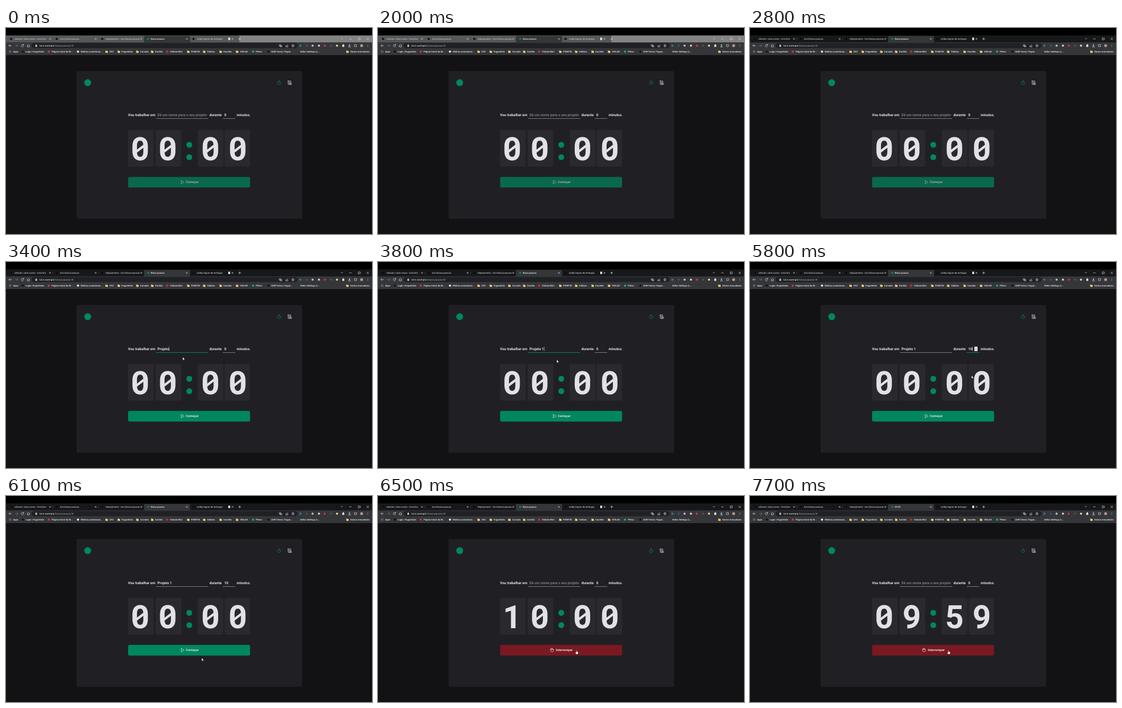
Write an HTML page that moves like this. It is 690 px wide and 388 px high and loops after 8000 ms.

```html
<!DOCTYPE html>
<html lang="pt-BR">
<head>
<meta charset="utf-8">
<title>Timer</title>
<style>
html, body { margin: 0; width: 100%; height: 100%; overflow: hidden; background: #000; }
svg { display: block; width: 100%; height: 100%; }
text { font-family: Roboto, sans-serif; text-rendering: geometricPrecision; white-space: pre; }
.ui { font-size: 4.25px; font-weight: 500; }
.form { font-size: 6.68px; font-weight: 700; fill: #e1e1e6; }
.label { font-size: 5.95px; font-weight: 700; fill: #e1e1e6; }
.digit { font-size: 60.7px; font-weight: 600; fill: #e1e1e6; text-anchor: middle; }
.line { fill: none; stroke-width: .75; stroke-linecap: round; stroke-linejoin: round; }
</style>
</head>
<body>
<svg id="stage" viewBox="0 0 690 388">
  <rect y="14" width="690" height="374" fill="#121214"/>
  <g id="browser"></g>
  <rect x="133" y="81" width="425.5" height="278.5" rx="3" fill="#202024"/>
  <circle cx="154" cy="103" r="6.5" fill="#00875f"/>
  <g class="line" stroke="#00875f">
    <circle cx="514.8" cy="103.6" r="3"/>
    <path d="M514.8 103.6l1.3-1.3M513.7 99.3h2.2"/>
  </g>
  <path class="line" stroke="#e1e1e6" d="M532 102v-1.2a1.1 1.1 0 0 0-1-1.2h5a1.1 1.1 0 0 1 1 1.2v3.8M532 102v3.5a1 1 0 0 0 1 1h4.5a1 1 0 0 0 .9-1.6h-4.6M533.8 102h2M533.8 103.6h2"/>

  <g class="form">
    <text x="230" y="166">Vou trabalhar em</text>
    <text id="task" x="285.5" y="166"></text>
    <text x="383.5" y="166">durante</text>
    <rect id="selection" x="411.3" y="159.5" width="4.3" height="8" fill="#2f83d8"/>
    <text id="minutes" x="411.5" y="166"></text>
    <text x="434.7" y="166">minutos.</text>
  </g>
  <rect id="taskLine" x="283" y="170" width="98" height="1"/>
  <rect id="minutesLine" x="408.800" y="170" width="23.4" height="1"/>
  <rect id="caret" y="159.5" width=".6" height="8" fill="#e1e1e6"/>
  <g id="spinner">
    <rect x="423" y="159.5" width="6" height="8.3" fill="#f0f0f0"/>
    <path d="M424.8 162.6l1.2-1.5 1.2 1.5zM424.8 164.8l1.2 1.5 1.2-1.5z" fill="#505050"/>
  </g>

  <g id="clock"></g>
  <circle cx="345.5" cy="220" r="5.5" fill="#00875f"/>
  <circle cx="345.5" cy="243.3" r="5.5" fill="#00875f"/>

  <g id="button">
    <rect id="buttonBox" x="230.2" y="280.4" width="229.9" height="20.1" rx="3"/>
    <g id="start">
      <path class="line" stroke="#e1e1e6" d="M330.7 287.2l5 3.1-5 3.1z"/>
      <text class="label" x="339" y="292.4">Começar</text>
    </g>
    <g id="stop">
      <path class="line" stroke="#e1e1e6" d="M325.3 290v-1.6a.8.8 0 0 1 1.6 0v-.7a.8.8 0 0 1 1.6 0v.7a.8.8 0 0 1 1.6 0v1.2a.5.5 0 0 1 1 0v1a2.9 2.9 0 0 1-5.8 0zM326.9 288.4v1.2M328.5 288.4v1.4"/>
      <text class="label" x="335.3" y="292.4">Interromper</text>
    </g>
  </g>

  <g id="cursor" stroke="#111" stroke-width=".4">
    <path id="arrow" fill="#fff" d="M0 0v5.8l1.3-1.2.9 2 .9-.4-.9-1.9h1.9z"/>
    <path id="hand" fill="#fff" d="M-.6 0q.6-.7 1.2 0v2.6q1.9.1 2.7 1v2q-.3 1.3-.9 1.9h-2.7l-2-3q.2-.9 1.7.1z"/>
  </g>
</svg>
<script>
const DURATION = 8000, STEP = 100;
const $ = id => document.getElementById(id);
const GREEN = '#00875f', GRAY = '#7c7c8a', WHITE = '#e1e1e6';

const rect = (x, y, w, h, fill, rx = 0) =>
  `<rect x="${x}" y="${y}" width="${w}" height="${h}" fill="${fill}" rx="${rx}"/>`;
const dot = (x, y, fill, r = 2) => `<circle cx="${x}" cy="${y}" r="${r}" fill="${fill}"/>`;
const label = (x, y, text, fill, extra = '') =>
  `<text class="ui" x="${x}" y="${y}" fill="${fill}" ${extra}>${text}</text>`;
const line = (d, color = '#d4d7da') => `<path class="line" stroke="${color}" d="${d}"/>`;
const cross = (x, y, r = 1.2) => line(`M${x - r} ${y - r}l${2 * r} ${2 * r}m0 ${-2 * r}l${-2 * r} ${2 * r}`);
const folder = x => `<path fill="#f3d06b" d="M${x - 2.2} 42.6h1.7l.6.7h2.2v3.4h-4.5z"/>`;

function tabStrip() {
  const tabs = [
    [16, 'refactor: rotas novas - torvi/bra'],
    [102, 'torvi/brasa-pausas'],
    [188, 'Deployments · torvi/brasa-pausas'],
    [273, 'Brasa pausas'],
    [360, 'nelbo/regras-de-entregas']
  ];
  let out = rect(0, 14, 690, 13, '#17181a')
    + `<g id="inactiveStrip">${rect(0, 14, 440, 13, '#56575a')}${rect(440, 14, 250, 13, '#828282')}</g>`
    + rect(260, 15, 87, 13, '#35363a', 2);
  tabs.forEach(([x, title], i) => {
    const active = i === 3;
    out += dot(x - (active ? 5 : 6.5), 20.5, active ? GREEN : '#0b0c0e', 2)
      + label(x, 22, title, active ? '#f1f3f4' : '#c0c3c7', active ? 'id="tabTitle"' : '')
      + cross(83 + 86 * i, 20.5);
    if (i < 2) out += rect(88 + 86 * i, 18, .5, 5, '#4a4c50');
  });
  return out + rect(419, 18.2, 3.5, 4.5, '#e8eaed')
    + line('M438.3 20.5h4.4m-2.2-2.2v4.4M631.7 19.5l1.5 1.5 1.5-1.5M647.5 20.5h3.5M664.5 18.8h3.4v3.4h-3.4z')
    + cross(682, 20.5, 1.7);
}

function toolbar() {
  const extensions = [[555, '#287d93'], [567, '#4a5055'], [578, '#b9bdc2'], [590, '#cfcfc4'],
    [601, '#db285f'], [613, '#55514a'], [624, '#e5cf90']];
  return rect(0, 27, 690, 24, '#35363a') + rect(48, 28.3, 502, 9.7, '#202124', 4.8)
    + line('M10.5 33.2h-5m2-2l-2 2 2 2')
    + line('M17.5 33.2h5m-2-2l2 2-2 2', '#77797d')
    + line('M33.2 32a2.3 2.3 0 1 0 .1 2.3m.1-3.6v1.6h-1.6M39.7 33.4l2.5-2.4 2.5 2.4m-4.3-.4v2.6h3.6v-2.6')
    + rect(55.5, 32.7, 3, 2.7, '#d4d7da') + line('M56.1 32.7v-.8a.9.9 0 0 1 1.8 0v.8')
    + `<text x="63" y="34.9" font-size="4.7" fill="#a9aeb4"><tspan fill="#f1f3f4">torvi.exemplo</tspan>/brasa-pausas/#/</text>`
    + line('M515.5 31.5h2.5v2.5h-2.5zM517.5 33h2.5v2.5h-2.5zM527.5 33v2.5h4v-1.5m-2.5 0q0-2 2.5-2.2')
    + line('M541 30.9l.7 1.5 1.7.2-1.2 1.2.3 1.7-1.5-.8-1.5.8.3-1.7-1.2-1.2 1.7-.2z')
    + extensions.map(([x, color]) => dot(x, 33.2, color)).join('')
    + rect(634, 31.8, 3.7, 3.7, '#e8eaed') + dot(636, 31.5, '#e8eaed', 1)
    + line('M647.5 30.8v3m-1.5-1.4l1.5 1.5 1.5-1.5m-3.5 3.2h4', '#f1f3f4')
    + line('M657.2 31.3h3.7v3.7h-3.7z') + dot(670.5, 33.2, '#b89585', 2.7)
    + [31.5, 33.2, 34.9].map(y => dot(682, y, '#d5d7da', .5)).join('');
}

// Each bookmark: text x, text, and icon colour; without a colour it gets a folder.
function bookmarks() {
  const items = [
    [37, 'Login | Foguelinda', '#101214'], [86, 'Página Inicial do M...', '#d7363c'],
    [141, 'Minhas assinaturas...', '#e8eaed'], [195, 'UVZ'], [218, 'Foguelinda'],
    [253, 'Curvado'], [281, 'Zumblo'], [309, 'Vizbolo Mini', '#ee2222'], [349, 'PONTOS'],
    [379, 'Valdoro'], [410, 'tracelim'], [441, 'VIOLAO'], [471, 'Plinvo', '#14ad78'],
    [500, 'QVB Treino | Fogue...', '#101214'], [555, 'Editor Settings (L...', 'none'],
    [649, 'Outros marcadores']
  ];
  let out = label(13.5, 46.1, 'Apps', '#f1f3f4');
  for (let i = 0; i < 9; i++)
    out += rect(5.7 + i % 3 * 1.5, 42.5 + Math.floor(i / 3) * 1.5, 1, 1, ['#e66057', '#68b36b', '#5b9ee8'][i % 3]);
  for (const [x, text, color] of items)
    out += (color ? dot(x - 5.3, 44.5, color, 2.1) : folder(x - 5.3)) + label(x, 46.1, text, '#f1f3f4');
  return out;
}

const digitCenters = [253, 305, 385.3, 437];
$('browser').innerHTML = tabStrip() + toolbar() + bookmarks();
$('clock').innerHTML = [230, 282, 361.5, 412].map((x, i) => {
  const c = digitCenters[i];
  return rect(x, 192, i === 3 ? 48 : 48.5, 69, '#29292e', 3)
    + `<text class="digit" x="${c}" y="248.8"></text>`
    + `<path class="slash" d="M${c - 7.5} 233l15-11.5" stroke="${WHITE}" stroke-width="4.6"/>`;
}).join('');
const digits = document.querySelectorAll('.digit');
const slashes = document.querySelectorAll('.slash');

const pointerPath = [
  [2900, 360, 215], [3100, 322, 165], [3200, 322, 165], [3500, 337, 184], [3800, 337, 184],
  [4300, 413, 165], [4600, 413, 163], [4800, 409, 161], [5100, 409, 161],
  [5200, 444, 164], [5600, 444, 164], [6100, 369, 305], [6200, 369, 305], [6300, 374, 290.5]
];

// Latest value whose start time has passed.
const latest = (t, steps) => steps.reduce((value, [start, next]) => t >= start ? next : value, steps[0][1]);

function pointerAt(t) {
  const i = pointerPath.findIndex(p => p[0] > t);
  if (i < 0) return pointerPath.at(-1).slice(1);
  if (i === 0) return null;
  const [t0, x0, y0] = pointerPath[i - 1], [t1, x1, y1] = pointerPath[i];
  const k = (t - t0) / (t1 - t0), ease = k * k * (3 - 2 * k);
  return [x0 + (x1 - x0) * ease, y0 + (y1 - y0) * ease];
}

const show = (id, visible) => $(id).style.display = visible ? '' : 'none';
const write = (node, text) => { if (node.textContent !== text) node.textContent = text; };

function render(t) {
  const running = t >= 6500;
  const task = running ? '' : latest(t, [[0, ''], [3100, 'P'], [3300, 'Proj'], [3400, 'Projeto'], [3500, 'Projeto 1']]);
  const focus = latest(t, [[0, ''], [3000, 'task'], [4400, 'minutes'], [5900, '']]);

  show('inactiveStrip', t < 2600);
  write($('task'), task || 'Dê um nome para o seu projeto');
  $('task').setAttribute('fill', task ? WHITE : GRAY);
  write($('minutes'), t >= 5200 && !running ? '10' : '0');
  for (const field of ['task', 'minutes'])
    $(field + 'Line').setAttribute('fill', focus === field ? GREEN : GRAY);

  const selected = t >= 4700 && t < 5200;
  show('selection', selected);
  show('spinner', t >= 4200 && t < 5900);
  show('caret', focus && !selected);
  if (focus) {
    const width = focus === 'task' && !task ? 0 : $(focus).getComputedTextLength();
    $('caret').setAttribute('x', (focus === 'task' ? 285.5 : 411.5) + width + .2);
  }

  const time = latest(t, [[0, '0000'], [6500, '1000'], [7400, '0959']]);
  digits.forEach((node, i) => {
    write(node, time[i]);
    slashes[i].style.display = time[i] === '0' ? '' : 'none';
  });
  write($('tabTitle'), latest(t, [[0, 'Brasa pausas'], [6600, '10:00'], [7700, '09:59']]));

  $('button').setAttribute('opacity', t < 3100 ? .7 : 1);
  $('buttonBox').setAttribute('fill', latest(t, [[0, GREEN], [6300, '#015f43'], [6500, '#7a1921']]));
  show('start', !running);
  show('stop', running);

  const pointer = pointerAt(t);
  show('cursor', pointer);
  show('arrow', t < 6300);
  show('hand', t >= 6300);
  if (pointer) $('cursor').setAttribute('transform', `translate(${pointer})`);
}

const begin = performance.now();
function tick() {
  const elapsed = (performance.now() - begin) % DURATION;
  render(Math.floor(elapsed / STEP) * STEP);
  requestAnimationFrame(tick);
}
tick();
</script>
</body>
</html>
```
